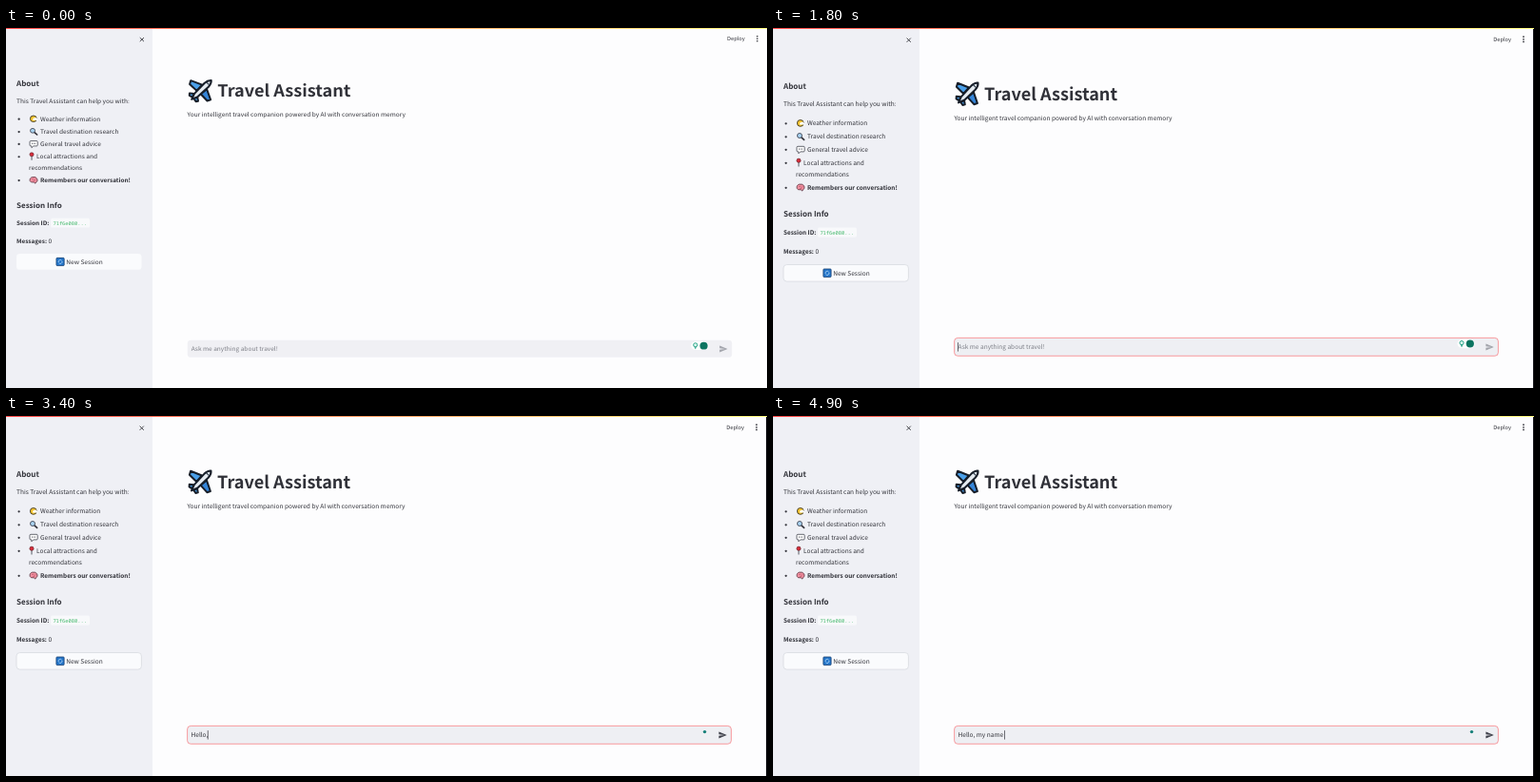
Recreate the animation shown at these times as an HTML page. Size 800x378 px, loop 5 s.

```html
<!DOCTYPE html>
<html lang="en">
<head>
<meta charset="utf-8">
<title>Travel Assistant</title>
<style>
  html, body { margin: 0; width: 100%; height: 100%; overflow: hidden; background: #fdfdfe; }
  svg { display: block; width: 100%; height: 100%; }
  text {
    font: 6.55px "Noto Sans CJK JP", "Noto Sans CJK SC", "Noto Sans", sans-serif;
    fill: #303138; white-space: pre; text-rendering: geometricPrecision;
  }
  .bold { font-size: 6.4px; font-weight: 700; }
  .heading { font-size: 8px; font-weight: 700; }
  .title { font-size: 18.1px; font-weight: 700; }
  .small { font-size: 5.71px; }
  .code { font: 5.38px "Noto Sans Mono", monospace; fill: #3fb768; }
  .hint { fill: #7c7e86; }
</style>
</head>
<body>
<svg viewBox="0 0 800 378" preserveAspectRatio="none">
  <defs>
    <linearGradient id="strip">
      <stop offset="0" stop-color="#ff4b4b"/>
      <stop offset="1" stop-color="#fffd80"/>
    </linearGradient>
  </defs>
  <rect width="800" height="378" fill="#fdfdfe"/>
  <rect width="154" height="378" fill="#eff0f5"/>
  <rect width="800" height="1" fill="url(#strip)"/>

  <g id="page">
    <path d="M140.6 10.6l4.2 4.2m0-4.2l-4.2 4.2" stroke="#303138" stroke-width=".9"/>
    <text class="small" x="757.3" y="13.8">Deploy</text>
    <g fill="#303138">
      <circle cx="789" cy="9.2" r=".85"/><circle cx="789" cy="11.8" r=".85"/><circle cx="789" cy="14.4" r=".85"/>
    </g>

    <!-- sidebar -->
    <text class="heading" x="11" y="63.7">About</text>
    <text x="11" y="82.3">This Travel Assistant can help you with:</text>
    <g id="bullets" fill="#303138"></g>
    <text x="36" y="102.3">Weather information</text>
    <text x="36" y="116.3">Travel destination research</text>
    <text x="36" y="129.8">General travel advice</text>
    <text x="32" y="143.8">Local attractions and</text>
    <text x="24" y="156">recommendations</text>
    <text class="bold" x="36" y="169.8">Remembers our conversation!</text>

    <!-- sun behind cloud -->
    <circle cx="28.8" cy="99.9" r="3.4" fill="#f6c52f" stroke="#3a3527" stroke-width=".9"/>
    <path d="M28.2 101.4q-.6-2.2 1.5-2.3 1.8-1.3 2.8.6 1.5.7.3 1.9z" fill="#fff"/>
    <!-- magnifier -->
    <path d="M29.6 114.6l3 2.8" stroke="#35343b" stroke-width="1.7" stroke-linecap="round"/>
    <circle cx="28" cy="113" r="2.5" fill="#a9d4f2" stroke="#414654" stroke-width=".9"/>
    <!-- speech bubble -->
    <path d="M26 124.3h6.2q1 0 1 1v3.6q0 1-1 1h-3.4l-1.9 1.9v-1.9h-.9q-1 0-1-1v-3.6q0-1 1-1z" fill="#fff" stroke="#41434d" stroke-width=".8"/>
    <path d="M27.1 127.1h.9m.7 0h.9m.7 0h.9" stroke="#41434d"/>
    <!-- pin -->
    <path d="M27 140v5.5" stroke="#555863" stroke-width="1"/>
    <circle cx="27" cy="139.2" r="2.1" fill="#d92d3a" stroke="#5a1a24" stroke-width=".6"/>
    <!-- brain -->
    <path d="M25.2 168.4q-.8-3.4 2.5-4.3 3.8-.9 5.1 2 1.1 2.9-1.4 3.7l-.5 1.3-1.7-1.3q-3.4.6-4-1.4z" fill="#f291a0" stroke="#54303d" stroke-width=".8"/>
    <path d="M27 166.8q1.2-1.3 2 0t2.6-.4M28 168.6h2.4" fill="none" stroke="#b64e65" stroke-width=".6"/>

    <text class="heading" x="11" y="198">Session Info</text>
    <text class="bold" x="11" y="216.7">Session ID:</text>
    <rect x="47" y="209.5" width="41" height="10.2" rx="1.8" fill="#f8f9fb"/>
    <text class="code" x="49.4" y="216.7">71f6e080...</text>
    <text x="11" y="236.5"><tspan class="bold">Messages:</tspan> 0</text>
    <rect id="button" x="11" y="248.5" width="131.4" height="17.6" rx="3.6" fill="#fafbfd" stroke-width=".7"/>
    <rect x="52.9" y="253" width="8.2" height="8.6" rx=".8" fill="#2475c9" stroke="#183f70" stroke-width=".8"/>
    <path d="M55.1 257.9a2 2 0 0 1 3.5-1.8m.3.6a2 2 0 0 1-3.4 2" fill="none" stroke="#b9dcfa" stroke-width=".8"/>
    <text x="63.2" y="259.8">New Session</text>

    <!-- airplane -->
    <g stroke="#161d28" stroke-width="2" stroke-linejoin="round">
      <path d="M206 62.5l-11.9-4.7-1.2 4 7.4 7.2z" fill="#4a9fe8"/>
      <path d="M210.9 67.4l4 11.6-3.6 1.2-6.8-7.6z" fill="#3585d8"/>
      <path d="M197.2 72.3l-4.4-.6-.2 2.6 3.2 2zM201 76l.8 4.4-2.4.6-2.2-3.4z" fill="#4a9fe8"/>
      <path d="M195 78.4l2.9-6.2 10.4-11.4q3.4-3.4 7.2-3.2.4 3.7-2.8 7.1l-11.2 10.8z" fill="#e4eaf0"/>
    </g>
    <path d="M210.6 59.8l2.7 2.6" stroke="#33404f" stroke-width="1.2"/>
    <text class="title" x="222" y="75.9">Travel Assistant</text>
    <text x="190.4" y="97.2">Your intelligent travel companion powered by AI with conversation memory</text>
    <path id="ibeam" d="M255.6 90.4v9.2" stroke="#303138" stroke-width=".9"/>
  </g>

  <g id="composer">
    <rect id="field" x="190.6" y="325.4" width="571.8" height="18.9" rx="3.6" stroke-width=".65"/>
    <text id="message" x="194.5" y="337.3"></text>
    <rect id="caret" y="330.2" width=".7" height="9.4" fill="#303138"/>
    <g id="helpers">
      <rect x="719.6" y="326.8" width="18.2" height="9.4" rx="4.7" fill="#fff"/>
      <circle cx="724" cy="330.6" r="2.1" fill="#d9f5ec" stroke="#169a7e" stroke-width=".9"/>
      <path d="M723 333.4h2m-1.6 1.2h1.2" stroke="#169a7e" stroke-width=".8"/>
      <circle cx="732.8" cy="331.5" r="4.1" fill="#0c7460"/>
    </g>
    <circle id="dot" cx="734.5" cy="331.6" r="1.7" fill="#157f78"/>
    <path id="send" transform="translate(748.6 330.2) scale(.4)" d="M2 21l21-9L2 3v7l15 2-15 2z"/>
  </g>

  <path id="pointer" d="M0 0v7.1l1.7-1.5 1.2 2.6 1.2-.6-1.2-2.4 2.2-.2z" fill="#fff" stroke="#555" stroke-width=".7"/>
  <rect id="edge" x="799" y="1" width="1" height="377" fill="#15151a"/>
</svg>
<script>
  const DURATION = 5000, SQUASH = 0.954;
  const $ = id => document.getElementById(id);
  const show = (id, on) => $(id).setAttribute('visibility', on ? 'visible' : 'hidden');
  const set = (id, name, value) => $(id).setAttribute(name, value);

  $('bullets').innerHTML = [100, 114, 127.5, 141.5, 167.5]
    .map(y => `<circle cx="13.6" cy="${y + .3}" r="1.15"/>`).join('');

  // Time of each keystroke, with the characters it adds
  const keys = [
    [2400, 'H'], [2900, 'e'], [3000, 'l'], [3100, 'l'], [3200, 'o'], [3400, ','],
    [3600, ' '], [4200, 'm'], [4400, 'y'],
    [4500, ' n'], [4600, 'a'], [4700, 'm'], [4800, 'e'], [4900, ' ']
  ];

  function draw(t) {
    const settled = t >= 100, focused = t >= 1800;
    const typed = keys.filter(([at]) => t >= at).map(([, chars]) => chars).join('');

    // The window opens slightly squashed, then snaps to size
    const scale = settled ? '' : `scale(1.001 ${SQUASH})`;
    set('page', 'transform', scale);
    set('composer', 'transform', settled ? '' : `translate(0 ${378 * (1 - SQUASH)}) ${scale}`);
    set('button', 'stroke', settled ? '#d5d7dd' : 'none');
    show('edge', settled);
    show('ibeam', settled && t < 1500);

    const step = Math.floor(t / 100);
    show('pointer', step >= 2 && step <= 4);
    set('pointer', 'transform', `translate(${331 + 38 * (step - 3)} ${226 + 67 * (step - 3)})`);

    set('field', 'fill', focused ? '#eeeff3' : '#f0f0f4');
    set('field', 'stroke', focused ? '#f96a6e' : 'none');
    const message = $('message');
    message.textContent = typed || 'Ask me anything about travel!';
    message.setAttribute('class', typed ? '' : 'hint');
    show('caret', focused);
    set('caret', 'x', 194 + (typed ? message.getComputedTextLength() : 0));
    show('helpers', t < 2900);
    show('dot', t >= 2900);
    set('send', 'fill', typed ? '#40424c' : '#a2a4ab');
  }

  const start = performance.now();
  function frame() {
    draw((performance.now() - start) % DURATION);
    requestAnimationFrame(frame);
  }
  frame();
</script>
</body>
</html>
```
